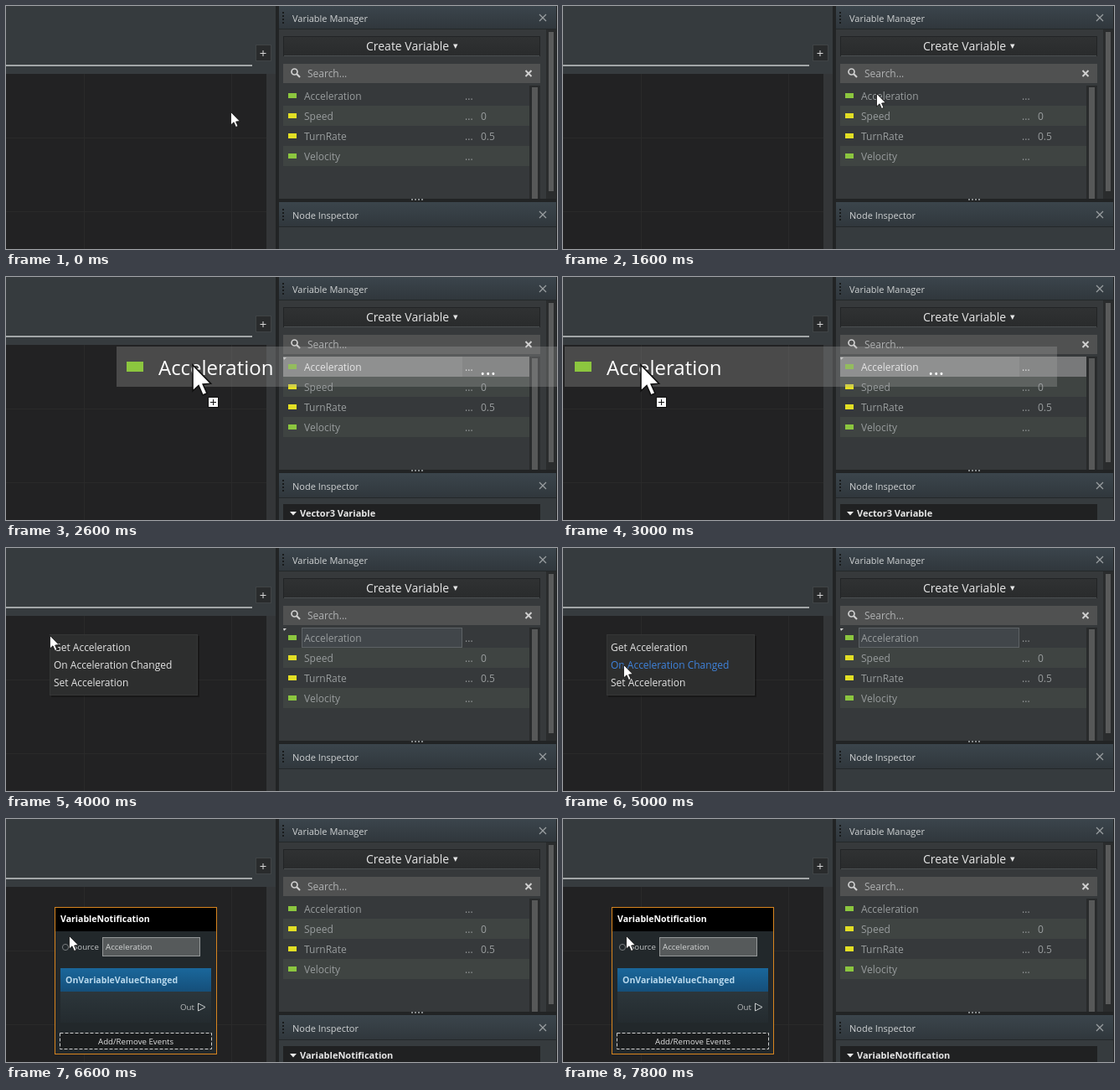
These frames come from a looping animation (658x290 px, 8 s). An HTML page with a canvas:

```html
<!DOCTYPE html>
<html lang="en">
<head>
<meta charset="utf-8">
<title>Variable drag and drop</title>
<style>
  html, body { margin: 0; width: 100%; height: 100%; overflow: hidden; background: #222223; }
  canvas { display: block; }
</style>
</head>
<body>
<canvas id="stage" width="658" height="290"></canvas>
<script>
const ctx = document.getElementById('stage').getContext('2d');
const LOOP = 8000, STEP = 200;
const GREEN = '#8cc63f', YELLOW = '#e2df25';
const ROWS = [
  ['Acceleration', GREEN, ''], ['Speed', YELLOW, '0'],
  ['TurnRate', YELLOW, '0.5'], ['Velocity', GREEN, '']
];
const MENU = ['Get Acceleration', 'On Acceleration Changed', 'Set Acceleration'];

// Pointer path: time, x, y
const PATH = [
  [0, 268, 126], [600, 288, 230], [1200, 353, 105], [1400, 474, 49], [1600, 374, 104],
  [2000, 374, 104], [2200, 352, 104], [3000, 92, 104], [3400, 52, 104], [4000, 52, 104],
  [5000, 72, 139], [5400, 72, 139], [5600, 67, 137], [6000, 75, 139], [8000, 75, 139]
];

function pointerAt(t) {
  const i = Math.max(1, PATH.findIndex(k => k[0] >= t));
  const [t0, x0, y0] = PATH[i - 1], [t1, x1, y1] = PATH[i];
  const p = (t - t0) / (t1 - t0);
  return [x0 + (x1 - x0) * p, y0 + (y1 - y0) * p];
}

function rect(x, y, w, h, fill, stroke) {
  if (fill) { ctx.fillStyle = fill; ctx.fillRect(x, y, w, h); }
  if (stroke) {
    ctx.lineWidth = 1;
    ctx.strokeStyle = stroke;
    ctx.strokeRect(x + .5, y + .5, w - 1, h - 1);
  }
}

function fade(y, h, top, bottom) {
  const g = ctx.createLinearGradient(0, y, 0, y + h);
  g.addColorStop(0, top);
  g.addColorStop(1, bottom);
  return g;
}

function text(str, x, y, size, color, weight = 400) {
  ctx.font = `${weight} ${size}px "Open Sans", "Noto Sans", sans-serif`;
  ctx.fillStyle = color;
  ctx.fillText(str, x, y);
}

function poly(points, fill, stroke, width = 1) {
  ctx.beginPath();
  points.forEach(([x, y]) => ctx.lineTo(x, y));
  ctx.closePath();
  ctx.lineWidth = width;
  if (fill) { ctx.fillStyle = fill; ctx.fill(); }
  if (stroke) { ctx.strokeStyle = stroke; ctx.stroke(); }
}

function line(x0, y0, x1, y1, color, width = 1) {
  ctx.beginPath();
  ctx.moveTo(x0, y0);
  ctx.lineTo(x1, y1);
  ctx.strokeStyle = color;
  ctx.lineWidth = width;
  ctx.stroke();
}

function circle(x, y, r, color, width, fill) {
  ctx.beginPath();
  ctx.arc(x, y, r, 0, 7);
  if (fill) { ctx.fillStyle = fill; ctx.fill(); }
  ctx.strokeStyle = color;
  ctx.lineWidth = width;
  ctx.stroke();
}

function cross(x, y, r, color, width) {
  line(x - r, y - r, x + r, y + r, color, width);
  line(x - r, y + r, x + r, y - r, color, width);
}

function drawGraph() {
  rect(0, 0, 322, 290, '#363b3e');
  rect(0, 70, 294, 2, '#a3a7a8');
  rect(298, 46, 19, 20, '#292b2c', '#404446');
  line(303.5, 56.5, 310.5, 56.5, '#d8d8d8');
  line(307, 53, 307, 60, '#d8d8d8');
  rect(0, 81, 311, 209, '#222223');
  for (const x of [93, 269]) rect(x, 81, 1, 209, '#2a2a2a');
  for (const y of [157, 245]) rect(0, y, 311, 1, '#2a2a2a');
  rect(311, 81, 11, 209, '#343638');
}

function header(title, y, h) {
  rect(326, y, 331, h, fade(y, h, '#3b454c', '#30373c'));
  rect(326, y + h - 1, 331, 1, '#24282a');
  for (let i = 0; i < 4; i++) rect(330, y + h / 2 - 7 + i * 4, 2, 2, '#181a1b');
  text(title, 342, y + h / 2 + 4.5, 11, '#d0d3d4');
  cross(641, y + h / 2, 4, '#989da0', 1.2);
}

function rowContent([name, color, value], textColor) {
  rect(6, 9, 10, 6, color);
  text(name, 25, 17, 12, textColor);
  text('...', 217, 17, 12, textColor);
  text(value, 236, 17, 12, textColor);
}

function drawRows(selected, focused) {
  ROWS.forEach((row, i) => {
    const active = selected && !i;
    ctx.save();
    ctx.translate(331, 95 + i * 24);
    if (i % 2) rect(0, 0, 294, 24, '#3f4442');
    if (active) rect(0, 0, 294, 24, '#858687');
    if (active) rect(214, 0, 80, 24, '#78797a');
    if (focused && !i) rect(22, 0, 192, 24, '#41464a', '#5d6265');
    rowContent(row, active ? '#ffffff' : '#999d9e');
    if (active || focused && !i) poly([[0, 1], [4, 1], [1, 4]], '#d5d5d5');
    ctx.restore();
  });
}

function drawPanels(selected, focused, inspected) {
  rect(322, 0, 336, 290, '#222425');
  rect(326, 27, 331, 203, '#36393b');
  header('Variable Manager', 0, 28);

  rect(331, 36, 307, 24, fade(36, 24, '#303233', '#292b2c'), '#222425');
  rect(332, 59, 305, 1, '#4b4f51');
  text('Create Variable', 430, 53, 14, '#e6e6e6');
  poly([[534, 45.5], [539.5, 45.5], [536.8, 51]], '#e6e6e6');

  rect(331, 69, 307, 23, '#505151');
  circle(344.5, 78.5, 3.5, '#d0d0d0', 1.7);
  line(347, 81, 351, 85, '#d0d0d0', 2.2);
  text('Search...', 360, 85, 12, '#b0b2b3');
  cross(624, 80.5, 3.5, '#d0d0d0', 2);

  rect(331, 95, 307, 135, '#36393b');
  drawRows(selected, focused);
  rect(625, 95, 13, 135, '#292b2c');
  rect(628, 97, 7, 133, '#575858');
  rect(645, 28, 12, 202, '#2a2c2d');
  rect(648, 31, 6, 190, '#5a5b5b');

  for (let i = 0; i < 4; i++) rect(484 + i * 4, 230, 2, 2, '#85898b');
  rect(326, 234, 331, 56, '#363b3e');
  header('Node Inspector', 234, 30);
  if (inspected) {
    rect(331, 271, 307, 19, '#202122');
    poly([[339, 280], [347, 280], [343, 284.5]], '#e8e8e8');
    text(inspected, 351, 286, 11, '#e8e8e8', 700);
  }
}

function drawMenu(py) {
  rect(54, 105, 177, 73, 'rgba(0,0,0,.3)');
  rect(52, 103, 177, 73, '#2d2e2e', '#353636');
  const hover = Math.floor((py - 108) / 21);
  MENU.forEach((item, i) => text(item, 57, 123 + i * 21, 12, i === hover ? '#3f83dc' : '#e4e4e4'));
}

function drawNode() {
  rect(58, 105, 194, 176, '#22282b', '#d8851f');
  rect(59, 106, 192, 28, '#000');
  text('VariableNotification', 65, 123, 10.55, '#fff', 700);

  circle(71, 153, 3.6, '#777b7d', 1);
  text('Source', 80, 156, 9.7, '#c4c7c8');
  rect(115, 141, 117, 23, '#565a5b', '#959899');
  text('Acceleration', 119, 156, 9.7, '#d2d4d4');

  rect(65, 178, 180, 65, fade(206, 37, '#2c363b', '#242b2f'));
  rect(65, 178, 180, 28, fade(178, 28, '#1a679b', '#154f7a'));
  text('OnVariableValueChanged', 71, 196, 10.55, '#b9d9ed', 700);
  text('Out', 208, 228, 9.7, '#b9bcbd');
  poly([[229.5, 220], [238, 224.5], [229.5, 229]], null, '#c8cbcc');

  rect(64, 255, 182, 20, '#1b1d1e');
  ctx.setLineDash([4, 2]);
  rect(64, 255, 182, 20, null, '#d0d0d0');
  ctx.setLineDash([]);
  text('Add/Remove Events', 110, 269, 9.7, '#e0e0e0');
}

function drawGhost(x) {
  ctx.save();
  ctx.translate(x, 83);
  ctx.scale(2, 2);
  rect(0, 0, 294, 24, 'rgba(165,165,165,.3)');
  rowContent(ROWS[0], '#fff');
  ctx.restore();
}

function drawArrow(x, y, scale) {
  ctx.save();
  ctx.translate(x, y);
  ctx.scale(scale, scale);
  poly([[.5, .5], [.5, 16], [4, 12.8], [6.5, 18.5], [9, 17.4], [6.6, 12], [11.3, 11.6]],
    '#fff', '#111', .8);
  ctx.restore();
}

function drawPointer(x, y, dragging) {
  if (!dragging) return drawArrow(x, y, 1);
  if (x > 311) {
    circle(x + 16, y + 14, 14, '#d8120c', 5, '#fff');
    line(x + 6, y + 4, x + 26, y + 24, '#d8120c', 5);
    return;
  }
  drawArrow(x, y, 2);
  rect(x + 19, y + 39, 13, 13, '#fff', '#111');
  line(x + 22, y + 45.5, x + 29, y + 45.5, '#111');
  line(x + 25.5, y + 42, x + 25.5, y + 49, '#111');
}

function draw(now) {
  const t = Math.floor(now % LOOP / STEP) * STEP;
  const between = (a, b) => t >= a && t < b;
  const [x, y] = pointerAt(t);
  const selected = between(2000, 4000), dragging = between(2200, 4000);
  const placed = t >= 6600;

  drawGraph();
  if (placed) drawNode();
  drawPanels(selected, between(4000, 6600),
    selected ? 'Vector3 Variable' : placed && 'VariableNotification');
  if (between(4000, 6400)) drawMenu(y);
  if (dragging) drawGhost(x - 90);
  drawPointer(x, y, dragging);
  requestAnimationFrame(frame);
}

const start = performance.now();
function frame() { draw(performance.now() - start); }
frame();
</script>
</body>
</html>
```
